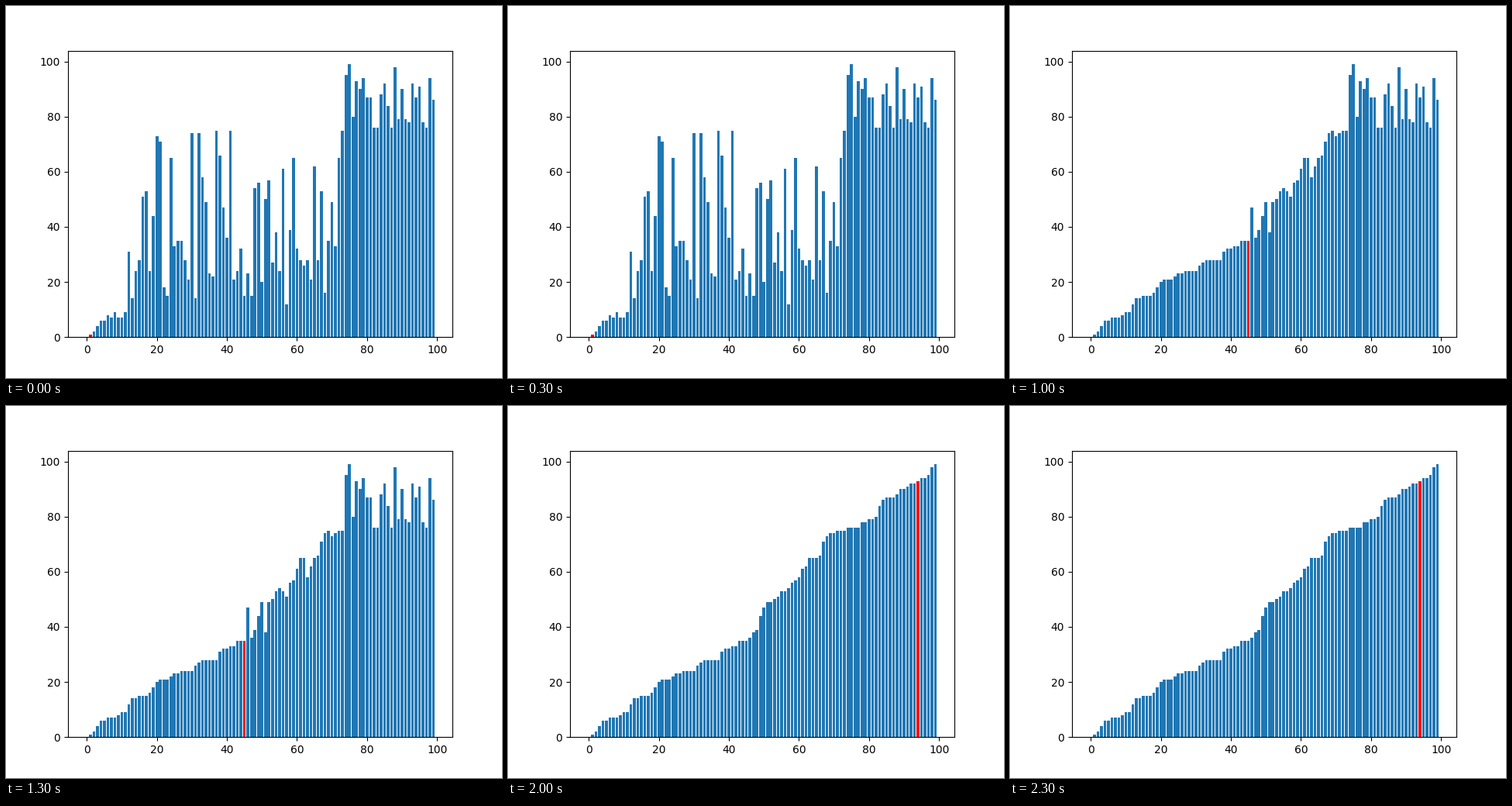
A matplotlib script for the animation above (2.5 s loop, 640 by 480 pixels).

```python
import matplotlib.pyplot as plt
from matplotlib.animation import FuncAnimation

START = [
    0, 1, 2, 4, 6, 6, 8, 7, 9, 7, 7, 9, 31, 14, 24, 28, 51, 53, 24, 44,
    73, 71, 18, 15, 65, 33, 35, 35, 28, 21, 74, 14, 74, 58, 49, 23, 22, 75, 66, 47,
    36, 75, 21, 24, 32, 15, 23, 15, 54, 56, 20, 50, 57, 27, 38, 24, 61, 12, 39, 65,
    32, 28, 26, 28, 21, 62, 28, 53, 16, 35, 49, 33, 65, 75, 95, 99, 80, 93, 90, 94,
    87, 87, 76, 76, 88, 92, 84, 76, 98, 79, 90, 79, 78, 92, 87, 91, 78, 76, 94, 86,
]
# Stretches between the pivots that are already in place
OPEN_RANGES = [(2, 10), (12, 72), (74, 99)]
FIRST_PIVOT = 1
SHOWN_PIVOTS = {14, 45, 76, 94}
BLUE, RED = "tab:blue", "red"


def partition(a, lo, hi):
    """Lomuto partition around the last element."""
    i = lo
    for j in range(lo, hi):
        if a[j] <= a[hi]:
            a[i], a[j] = a[j], a[i]
            i += 1
    a[i], a[hi] = a[hi], a[i]
    return i


def quicksort(a, lo, hi):
    """Sort in place, yielding each pivot's final position."""
    if lo < hi:
        p = partition(a, lo, hi)
        yield p
        yield from quicksort(a, lo, p - 1)
        yield from quicksort(a, p + 1, hi)


def record_steps():
    a = START.copy()
    steps = [(a.copy(), FIRST_PIVOT)]
    for lo, hi in OPEN_RANGES:
        for p in quicksort(a, lo, hi):
            if p in SHOWN_PIVOTS:
                steps.append((a.copy(), p))
    return steps


steps = record_steps()
fig, ax = plt.subplots(figsize=(6.4, 4.8), dpi=100)
bars = ax.bar(range(len(START)), START, color=BLUE)


def draw(frame):
    values, pivot = steps[frame]
    for k, (bar, value) in enumerate(zip(bars, values)):
        bar.set_height(value)
        bar.set_facecolor(RED if k == pivot else BLUE)
    return bars


anim = FuncAnimation(fig, draw, frames=len(steps), interval=500, repeat=True)
plt.show()
```
